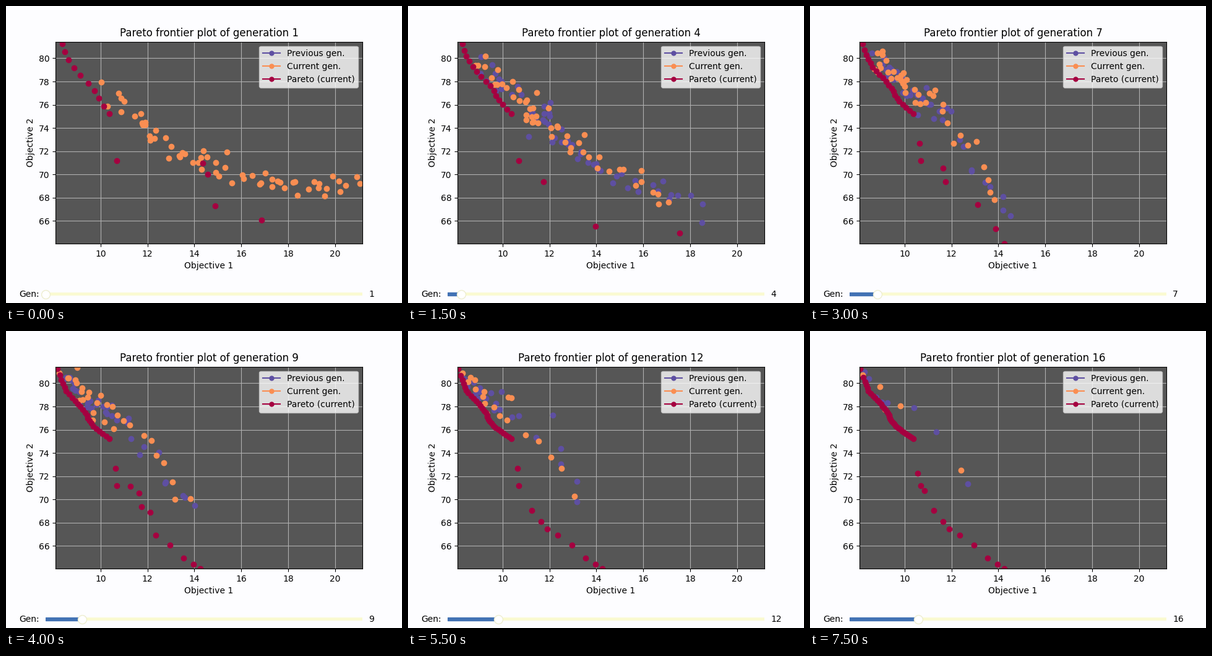
Animation, 640 px wide and 480 px high, one loop 8 s. Source, as a matplotlib script:

```python
import numpy as np
import matplotlib.pyplot as plt
from matplotlib.animation import FuncAnimation
from matplotlib.lines import Line2D
from matplotlib.widgets import Slider

GENS = 16
PURPLE, ORANGE, RED = "#5e4fa2", "#fa8e52", "#a50040"

# Centre line of the population at a few generations, interpolated between
STAGES = [1, 3, 6, 9, 16]
CENTRE = np.array([
    [(10.4, 77.0), (12.6, 72.5), (15.0, 70.4), (18.1, 68.7), (21.1, 69.4)],
    [(8.9, 80.0), (11.2, 75.4), (12.3, 73.6), (14.5, 70.0), (18.5, 67.8)],
    [(8.8, 79.8), (9.7, 78.2), (10.5, 77.0), (11.6, 75.0), (14.5, 66.5)],
    [(8.3, 81.0), (9.1, 79.3), (9.6, 78.2), (11.0, 77.0), (13.8, 70.0)],
    [(8.3, 80.5), (8.7, 79.1), (9.0, 78.4), (9.8, 77.8), (12.5, 72.5)]])

# Upper front, x as a function of y, at the start and at the end
KNEE_OLD = ([75.23, 76.24, 77.42, 78.64, 80.13, 81.25],
            [10.37, 10.0, 9.69, 9.08, 8.52, 8.37])
KNEE_NEW = ([75.23, 75.82, 76.3, 76.94, 77.36, 78.37, 79.28, 81.25],
            [10.37, 9.95, 9.63, 9.37, 9.32, 8.92, 8.47, 8.1])

# Lower front: best points by the generation that finds them
FINDS = {
    1: [(10.69, 71.19), (14.35, 70.98), (14.57, 70.01), (14.89, 67.3),
        (16.87, 66.07)],
    2: [(11.75, 69.37)],
    3: [(13.96, 65.54), (17.55, 64.96)],
    5: [(10.64, 72.68)],
    6: [(11.64, 70.55), (13.12, 67.4), (13.88, 65.33), (14.25, 64.05)],
    8: [(11.27, 71.13), (12.96, 66.05), (13.54, 64.95)],
    9: [(12.12, 68.9), (12.35, 66.93), (13.96, 64.4)],
    11: [(11.24, 69.06), (11.64, 68.1)],
    12: [(11.9, 67.46)],
    13: [(10.85, 70.76)],
    14: [(10.56, 72.25)],
}


def knee_x(y, gen):
    w = np.clip((gen - 1) / 10, 0, 1)
    return (1 - w) * np.interp(y, *KNEE_OLD) + w * np.interp(y, *KNEE_NEW)


def population(gen):
    """Shrinking cloud scattered around the centre line, behind the front."""
    if gen == 0:
        return np.empty((0, 2))
    rng = np.random.default_rng(40 + gen)
    u = np.linspace(0, 1, round(66 - 3.8 * gen))
    line = [[np.interp(gen, STAGES, CENTRE[:, k, axis]) for k in range(5)]
            for axis in (0, 1)]
    x, y = (np.interp(u, np.linspace(0, 1, 5), knots) for knots in line)
    y = y + rng.laplace(0, 0.4, u.size)
    x = np.maximum(x + rng.laplace(0, 0.15, u.size), knee_x(y, gen))
    return np.column_stack([x, y])


def non_dominated(pts):
    """Keep the points that no other point beats in both objectives."""
    return [p for p in pts
            if not any(q != p and q[0] <= p[0] and q[1] <= p[1] for q in pts)]


def pareto(gen):
    u = np.linspace(0, 1, round(8 + 1.7 * gen))
    y = 81.25 - 6.02 * u ** (1 - 0.025 * gen)
    knee = np.column_stack([knee_x(y, gen), y])
    found = [p for born, pts in FINDS.items() if born <= gen for p in pts]
    return np.vstack([knee, non_dominated(found)])


pop = [population(g) for g in range(GENS + 1)]

fig, ax = plt.subplots(figsize=(6.4, 4.8), dpi=100, facecolor="#fdfdff")
fig.subplots_adjust(left=0.125, right=0.9, bottom=0.2, top=0.88)
ax.set(xlim=(8.0752, 21.1709), ylim=(64.0511, 81.4313),
       xlabel="Objective 1", ylabel="Objective 2", facecolor="#565656")
ax.grid(True)

layers, handles = [], []
for color, label in ((PURPLE, "Previous gen."), (ORANGE, "Current gen."),
                     (RED, "Pareto (current)")):
    layers += ax.plot([], [], "o", color=color)
    handles.append(Line2D([], [], color=color, marker="o", markersize=5,
                          label=label))
ax.legend(handles=handles, loc="upper right")

slider = Slider(fig.add_axes([0.1, 0.02, 0.8, 0.02]), "Gen:", 1, 70,
                valinit=1, valstep=1, valfmt="%d", initcolor="none",
                color="#4272b4", track_color="lightgoldenrodyellow",
                handle_style={"edgecolor": "#eeeed0"})
slider.drawon = False


def update(i):
    gen = i + 1
    for layer, pts in zip(layers, (pop[gen - 1], pop[gen], pareto(gen))):
        layer.set_data(pts[:, 0], pts[:, 1])
    ax.set_title(f"Pareto frontier plot of generation {gen}")
    slider.set_val(gen)
    return layers


anim = FuncAnimation(fig, update, frames=GENS, interval=500, repeat=True,
                     repeat_delay=0, blit=False)
plt.show()
```
